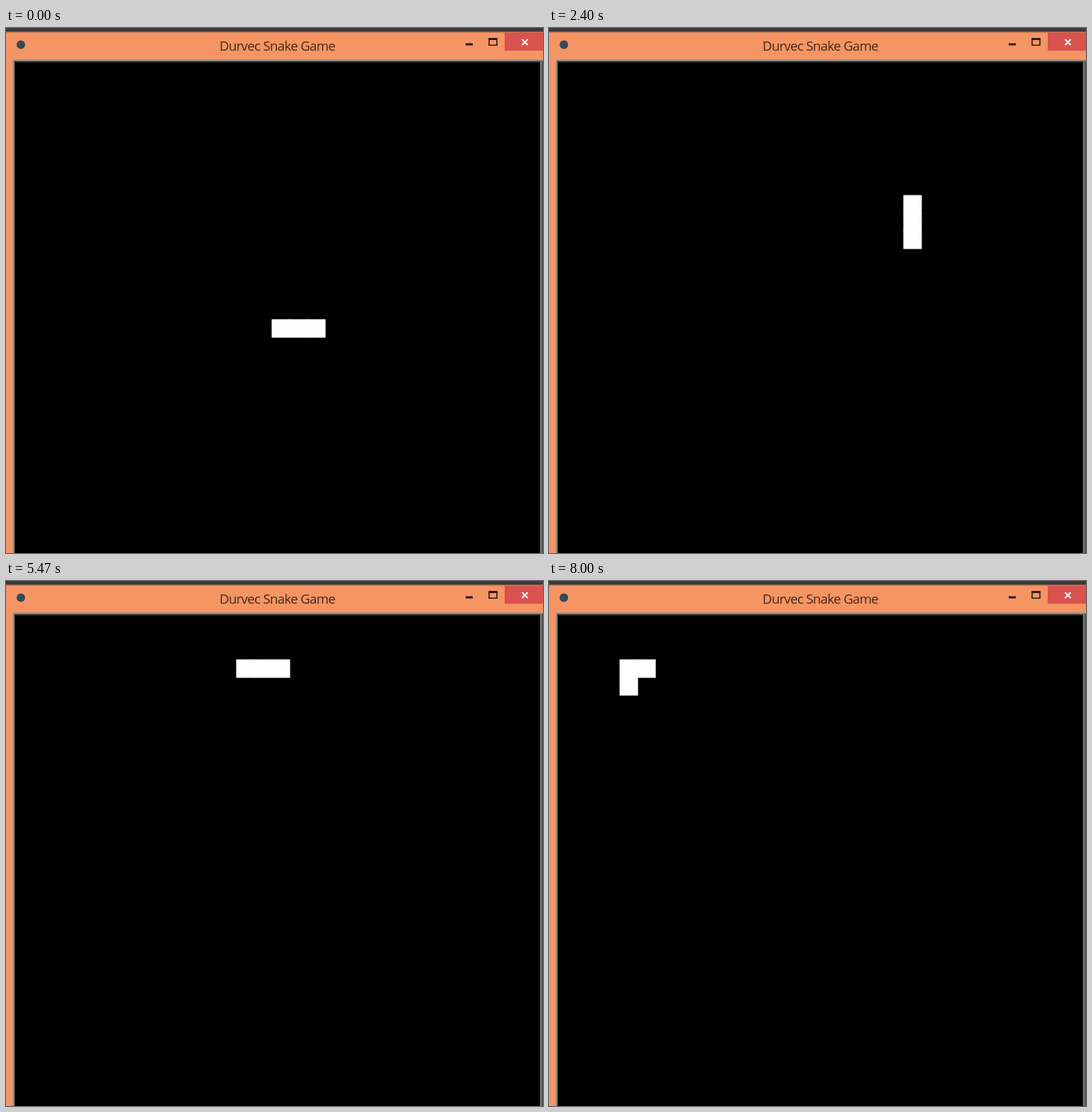
Recreate the animation shown at these times as an HTML page. Size 757 px wide and 740 px high, loop 8070 ms.

```html
<!DOCTYPE html>
<html lang="en">
<head>
<meta charset="utf-8">
<title>Durvec Snake Game</title>
<style>
  html, body { margin: 0; width: 100%; height: 100%; overflow: hidden; background: #000; }
  svg { display: block; }
  text { font: 18.5px "Open Sans", "Noto Sans", sans-serif; letter-spacing: -.6px; fill: #46291c; }
</style>
</head>
<body>
<svg width="757" height="740" viewBox="0 0 757 740">
  <!-- window frame -->
  <rect width="757" height="740" fill="#f59563"/>
  <rect width="757" height="5" fill="#3c3a3c"/>
  <rect y="5" width="757" height="1.5" fill="#a3694c"/>
  <rect x="9" y="44" width="748" height="696" fill="#b59a88"/>
  <rect x="10.5" y="45.5" width="744.5" height="695" fill="#77797a"/>
  <rect x="755" y="46" width="2" height="694" fill="#595452"/>
  <rect x="12" y="47" width="741" height="693" fill="#222627"/>
  <rect x="13" y="49" width="739" height="691"/>

  <!-- title bar -->
  <circle cx="21" cy="23.5" r="6" fill="#34495a"/>
  <text x="301" y="32">Durvec Snake Game</text>
  <rect x="648" y="21.5" width="10" height="3" fill="#2b1a14"/>
  <path d="M681 15V24.2H692V15" fill="none" stroke="#2b1a14" stroke-width="1.6"/>
  <rect x="680.2" y="14" width="12.6" height="3" fill="#2b1a14"/>
  <rect x="703" y="6.5" width="54" height="25.5" fill="#d9534f"/>
  <path d="M727.5 16L735.5 24M735.5 16L727.5 24" stroke="#fff" stroke-width="2"/>

  <g id="snake" fill="#fff"></g>
</svg>
<script>
const LOOP = 8070, CELL = 25, LENGTH = 3;
const steps = { R: [1, 0], U: [0, -1], L: [-1, 0], D: [0, 1] };
const beats = [200, 470, 670, 930];
const early = { 2200: 2130, 2470: 2400, 3200: 3130 };

// Four moves per second, a few of them slightly early.
const moveTimes = Array.from({ length: 32 }, (_, i) => {
  const time = Math.floor(i / 4) * 1000 + beats[i % 4];
  return early[time] || time;
});

// Every cell the head visits, after the starting body.
const trail = [[374.5, 410.5]];
for (const turn of "RR" + "RRR" + "U".repeat(12) + "L".repeat(16) + "D") {
  const [x, y] = trail.at(-1), [dx, dy] = steps[turn];
  trail.push([x + dx * CELL, y + dy * CELL]);
}

const snake = document.getElementById("snake");
const body = Array.from({ length: LENGTH }, () => {
  const cell = document.createElementNS("http://www.w3.org/2000/svg", "rect");
  cell.setAttribute("width", 26);
  cell.setAttribute("height", 26);
  return snake.appendChild(cell);
});

const start = performance.now();
function draw() {
  const time = (performance.now() - start) % LOOP;
  const moves = moveTimes.filter(t => t <= time).length;
  body.forEach((cell, i) => {
    const [x, y] = trail[moves + i];
    cell.setAttribute("x", x);
    cell.setAttribute("y", y);
  });
  requestAnimationFrame(draw);
}
draw();
</script>
</body>
</html>
```
